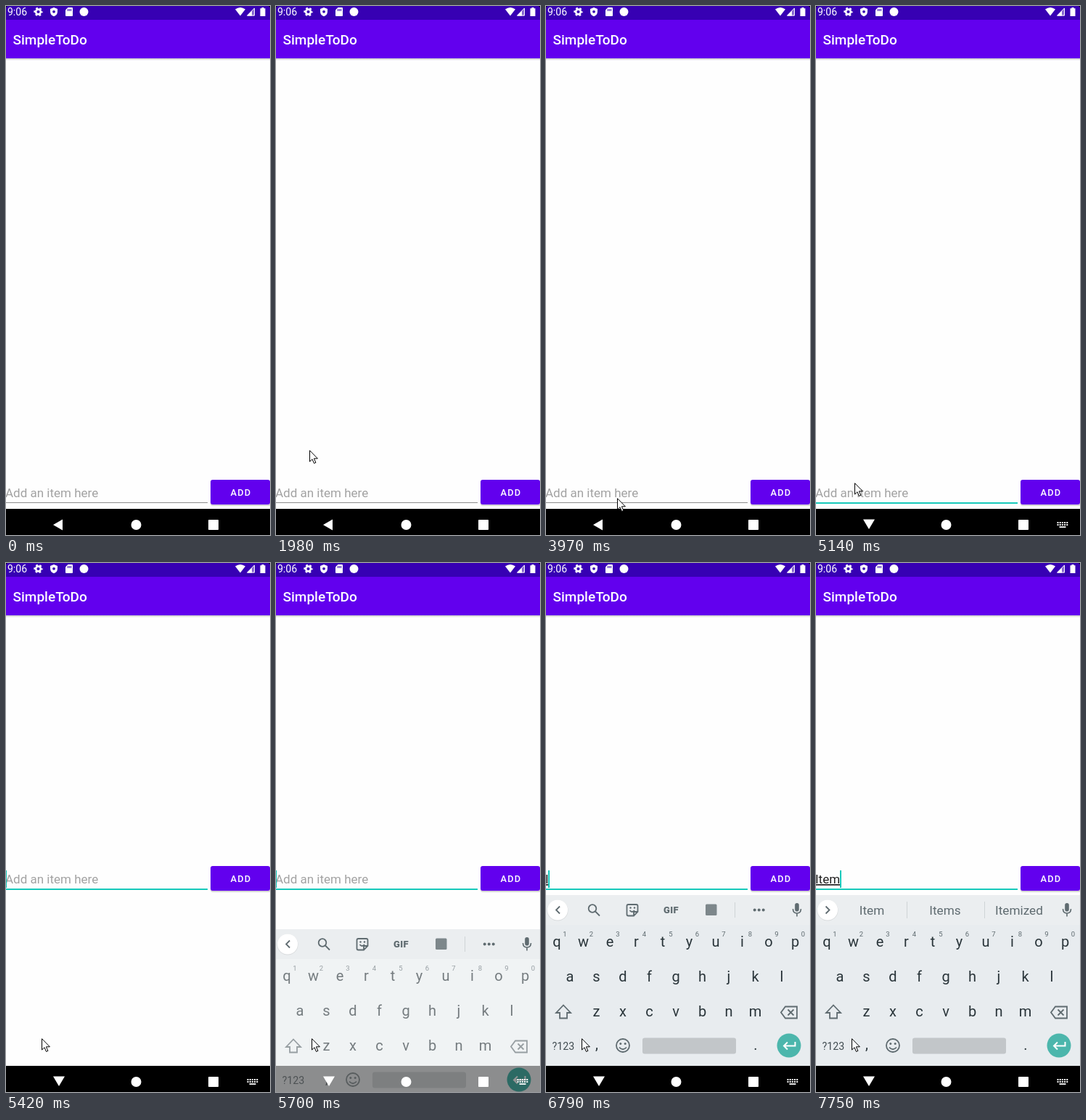
Recreate the animation shown at these times as an HTML page. Size 364 by 728 pixels, loop 8 s.

```html
<!DOCTYPE html>
<html lang="en">
<head>
<meta charset="utf-8">
<title>To-do app</title>
<style>
html, body { margin: 0; width: 100%; height: 100%; overflow: hidden; background: #fefefe; }
svg { display: block; width: 364px; height: 728px; }
text { font-family: Roboto, "Noto Sans", sans-serif; }
.mid { text-anchor: middle; }
.line { fill: none; stroke: #5f6b70; stroke-width: 1.8; }
.grey { fill: #5f6b70; }
.word { font-size: 17px; fill: #202020; text-decoration: underline; text-decoration-thickness: 1px; }
.suggest text { font-size: 17.2px; fill: #5f6b70; text-anchor: middle; }
.key { font-size: 20px; fill: #2a353a; text-anchor: middle; }
.digit { font-size: 9.5px; fill: #5f6b70; text-anchor: middle; }

.anim { animation: 8s step-end infinite; }
#cursor { animation-name: cursor; }
#row { animation-name: row; }
#caret { animation-name: caret; }
#focus { animation-name: focus; }
#hint { animation-name: hint; }
#back { animation-name: back; }
#down { animation-name: down; }
#navbg { animation-name: navbg; }
#board { animation-name: board; }
#keys { animation-name: keys; }
#tools { animation-name: tools; }
#suggest { animation-name: suggest; }
.s1 { animation-name: s1; }
.s2 { animation-name: s2; }
.s3 { animation-name: s3; }
.s4 { animation-name: s4; }
#w1 { animation-name: w1; }

@keyframes cursor {
  0% { opacity: 0; transform: translate(35px, 636px); }
  14.375% { opacity: 1; transform: translate(35px, 636px); }
  16.25% { opacity: 1; transform: translate(41px, 628px); }
  17.75% { opacity: 1; transform: translate(46px, 620px); }
  24.75% { opacity: 1; transform: translate(46px, 611px); }
  26.25% { opacity: 1; transform: translate(44px, 548px); }
  28.125% { opacity: 1; transform: translate(46px, 547px); }
  30% { opacity: 1; transform: translate(21px, 540px); }
  31.625% { opacity: 1; transform: translate(317px, 510px); }
  33.5% { opacity: 1; transform: translate(352px, 494px); }
  35.125% { opacity: 0; transform: translate(352px, 494px); }
  44.375% { opacity: 1; transform: translate(271px, 378px); }
  46.25% { opacity: 1; transform: translate(214px, 500px); }
  47.75% { opacity: 1; transform: translate(145px, 617px); }
  49.625% { opacity: 1; transform: translate(98px, 677px); }
  51.125% { opacity: 1; transform: translate(84px, 673px); }
  52.625% { opacity: 1; transform: translate(72px, 667px); }
  54.5% { opacity: 1; transform: translate(60px, 661px); }
  56% { opacity: 1; transform: translate(54px, 658px); }
  64.25% { opacity: 1; transform: translate(53px, 656px); }
  65.875%, 100% { opacity: 1; transform: translate(49px, 654px); }
}
@keyframes row {
  0% { transform: none; }
  65.875%, 100% { transform: translateY(-235px); }
}
@keyframes caret {
  0% { opacity: 0; transform: none; }
  57.5% { opacity: 1; transform: none; }
  62.5% { opacity: 0; transform: none; }
  67.75% { opacity: 1; transform: none; }
  73.125% { opacity: 0; transform: none; }
  80.25% { opacity: 1; transform: none; }
  84.875% { opacity: 1; transform: translateX(4px); }
  89.875% { opacity: 1; transform: translateX(10px); }
  93.375% { opacity: 1; transform: translateX(19px); }
  96.875%, 100% { opacity: 1; transform: translateX(34px); }
}
@keyframes focus { 0% { opacity: 0; } 57.5%, 100% { opacity: 1; } }
@keyframes hint { 0% { opacity: 1; } 84.875%, 100% { opacity: 0; } }
@keyframes back { 0% { opacity: 1; } 60.875% { opacity: .4; } 62.5%, 100% { opacity: 0; } }
@keyframes down { 0% { opacity: 0; } 60.875% { opacity: .6; } 62.5%, 100% { opacity: 1; } }
@keyframes navbg { 0% { opacity: 1; } 71.25% { opacity: .42; } 73.125%, 100% { opacity: 1; } }
@keyframes board {
  0% { opacity: 0; transform: translateY(47px); }
  71.25% { opacity: 1; transform: translateY(47px); }
  73.125%, 100% { opacity: 1; transform: none; }
}
@keyframes keys { 0% { opacity: .65; } 73.125%, 100% { opacity: 1; } }
@keyframes tools { 0% { opacity: 1; } 86.375%, 100% { opacity: 0; } }
@keyframes suggest { 0% { opacity: 0; } 86.375%, 100% { opacity: 1; } }
@keyframes w1 { 0% { opacity: 0; } 84.875% { opacity: 1; } 89.875%, 100% { opacity: 0; } }
@keyframes s1 { 0% { opacity: 0; } 86.375% { opacity: 1; } 89.875%, 100% { opacity: 0; } }
@keyframes s2 { 0% { opacity: 0; } 89.875% { opacity: 1; } 93.375%, 100% { opacity: 0; } }
@keyframes s3 { 0% { opacity: 0; } 93.375% { opacity: 1; } 96.875%, 100% { opacity: 0; } }
@keyframes s4 { 0% { opacity: 0; } 96.875%, 100% { opacity: 1; } }
</style>
</head>
<body>
<svg viewBox="0 0 364 728">
  <defs>
    <linearGradient id="shade" x2="0" y2="1">
      <stop stop-color="#000" stop-opacity=".22"/>
      <stop offset="1" stop-color="#000" stop-opacity="0"/>
    </linearGradient>
  </defs>
  <rect width="364" height="728" fill="#fefefe"/>

  <!-- app bar and status bar -->
  <rect y="72" width="364" height="3" fill="url(#shade)"/>
  <rect y="19" width="364" height="53" fill="#6200ee"/>
  <rect width="364" height="19" fill="#3700b3"/>
  <text x="9.5" y="53" font-size="19" font-weight="500" fill="#fff">SimpleToDo</text>
  <g fill="#fff">
    <text x="2" y="13.3" font-size="14">9:06</text>
    <g transform="translate(44.5 8)">
      <circle r="3.4" fill="none" stroke="#fff" stroke-width="2.6"/>
      <circle r="5.2" fill="none" stroke="#fff" stroke-width="2" stroke-dasharray="2.7 2.745" stroke-dashoffset="1.35"/>
    </g>
    <path d="M66 2l5 2v4c0 3-2 5.300-5 6.300c-3-1-5-3.300-5-6.300V4z"/>
    <circle cx="66" cy="7.800" r="1.900" fill="#3700b3"/>
    <path d="M85.500 2H91q1 0 1 1v10q0 1-1 1H83q-1 0-1-1V5.500z"/>
    <path d="M85.500 4v3M87.500 4v3M89.500 4v3" stroke="#3700b3"/>
    <circle cx="107.500" cy="8" r="6"/>
    <path d="M316 4.500q7-5 14 0L323 13.500z"/>
    <path d="M343 2.500v11H332z" opacity=".4"/>
    <path d="M339 6.500v7h-7z"/>
    <path d="M342.500 3v10H332.800z" fill="none" stroke="#fff"/>
    <path d="M352.500 2h3v1.200h2V14h-7V3.200h2z"/>
  </g>
  <path d="M0 0h3q-3 0-3 3zM364 0v3q0-3-3-3z" fill="#000"/>

  <!-- input row -->
  <g id="row" class="anim">
    <text id="hint" class="anim" x="-1" y="676" font-size="17" fill="#a2a2a2">Add an item here</text>
    <rect y="683" width="278" height="1" fill="#8c8c8c"/>
    <rect id="focus" class="anim" y="683" width="278" height="2" fill="#16c9bb"/>
    <text id="w1" class="word anim" x="-1" y="676">I</text>
    <text class="word anim s2" x="-1" y="676">It</text>
    <text class="word anim s3" x="-1" y="676">Ite</text>
    <text class="word anim s4" x="-1" y="676">Item</text>
    <rect id="caret" class="anim" x="-1" y="658" width="2" height="24" fill="#16c9bb"/>
    <rect x="282" y="653" width="83" height="35" rx="3.500" fill="#000" opacity=".16"/>
    <rect x="282" y="652" width="82" height="34" rx="3" fill="#6200ee"/>
    <text class="mid" x="324" y="674" font-size="12.800" font-weight="500" letter-spacing="1.200" fill="#fff">ADD</text>
  </g>

  <!-- keyboard -->
  <g id="board" class="anim">
    <g id="keys" class="anim">
      <rect y="457" width="364" height="235" fill="#e8ecef"/>
      <g id="letters"></g>
      <path class="line" d="M24 608.500L34 619h-5v7.500H19V619h-5z"/>
      <path class="line" d="M330 610.500h16v16h-16l-6-8zM333.500 614.500l8 8m0-8l-8 8"/>
      <text x="8.500" y="669.500" font-size="14.200" fill="#414c51">?123</text>
      <text class="key" x="70" y="669">,</text>
      <text class="key" x="289" y="670">.</text>
      <circle class="line" cx="106" cy="664" r="9"/>
      <path class="line" d="M101 666.500q5 5.500 10 0"/>
      <circle class="grey" cx="102.800" cy="661.500" r="1.500"/>
      <circle class="grey" cx="109.200" cy="661.500" r="1.500"/>
      <rect x="133" y="653.500" width="129" height="22" rx="3" fill="#c2c6c9"/>
    </g>
    <circle cx="335" cy="664" r="16.500" fill="#4cb6ac"/>
    <path d="M343.500 659v5.500H328m5-5l-5 5l5 5" fill="none" stroke="#fff" stroke-width="2"/>

    <rect y="457" width="364" height="41" fill="#ebeef0"/>
    <circle cx="16" cy="478" r="14.500" fill="#000" opacity=".08"/>
    <circle cx="16" cy="477.500" r="14" fill="#fff"/>
    <g class="line" transform="translate(346 477)">
      <rect class="grey" x="-2.800" y="-9" width="5.600" height="11.500" rx="2.800" stroke="none"/>
      <path d="M-5.500-1q0 6 5.500 6t5.500-6M0 5v4.500" stroke-width="1.600"/>
    </g>
    <g id="tools" class="anim">
      <path class="line" d="M19 472.500l-5 5l5 5"/>
      <circle class="line" cx="64" cy="475.500" r="5.300"/>
      <path class="line" d="M68 479.500l6 6" stroke-width="2.300"/>
      <path class="line" d="M113.500 470h11q2 0 2 2v8l-5.500 5.500h-7.500q-2 0-2-2V472q0-2 2-2zM126.500 480h-5.500v5.500M115.500 478q3 4 6.500 0"/>
      <circle class="grey" cx="116.500" cy="474.500" r="1.200"/>
      <circle class="grey" cx="122" cy="474.500" r="1.200"/>
      <text class="grey mid" x="172.500" y="482" font-size="13" font-weight="900" letter-spacing=".4">GIF</text>
      <rect x="220" y="469.500" width="15.500" height="15.500" rx="1.500" fill="#7d878b"/>
      <path d="M260.500 467v21" stroke="#cfd4d6"/>
      <g class="grey">
        <circle cx="287.700" cy="477.500" r="2"/><circle cx="293.700" cy="477.500" r="2"/><circle cx="299.700" cy="477.500" r="2"/>
      </g>
    </g>
    <g id="suggest" class="suggest anim">
      <path class="line" d="M13.500 472.500l5 5l-5 5"/>
      <path d="M125.500 466v23M232.500 466v23" stroke="#cfd4d6"/>
      <g class="anim s1"><text x="77" y="484">I</text><text x="178" y="484">I'm</text><text x="280" y="484">I'll</text></g>
      <g class="anim s2"><text x="77" y="484">It</text><text x="178" y="484">It's</text><text x="280" y="484">Its</text></g>
      <g class="anim s3"><text x="77" y="484">Ite</text><text x="178" y="484">Item</text><text x="280" y="484">It's</text></g>
      <g class="anim s4"><text x="77" y="484">Item</text><text x="178" y="484">Items</text><text x="280" y="484">Itemized</text></g>
    </g>
  </g>

  <!-- navigation bar -->
  <rect id="navbg" class="anim" y="692" width="364" height="36"/>
  <g fill="#fff">
    <path id="back" class="anim" d="M65 714l13-7.500v15z"/>
    <g id="down" class="anim">
      <path d="M65 706.500h16l-8 13.500z"/>
      <path d="M332.500 711h15M332.500 714h15" stroke="#fff" stroke-width="2" stroke-dasharray="2 1.200"/>
      <path d="M335.500 717h9" stroke="#fff" stroke-width="1.800"/>
    </g>
    <circle cx="179.500" cy="714" r="7"/>
    <rect x="279" y="707" width="14" height="14" rx=".8"/>
  </g>

  <g id="cursor" class="anim">
    <path d="M.5.700V16l3.500-3.300l2.500 5.700l2.400-1l-2.500-5.600h5z" fill="#fff" stroke="#000"/>
  </g>
</svg>
<script>
const letters = document.getElementById("letters");

function label(kind, x, y, str) {
  const el = document.createElementNS("http://www.w3.org/2000/svg", "text");
  el.setAttribute("class", kind);
  el.setAttribute("x", x);
  el.setAttribute("y", y);
  el.textContent = str;
  letters.append(el);
}

const step = 36.5;
[["qwertyuiop", 15, 528], ["asdfghjkl", 33, 576], ["zxcvbnm", 69.5, 624]].forEach(([row, x, y]) =>
  [...row].forEach((ch, i) => label("key", x + i * step, y, ch)));
[..."1234567890"].forEach((ch, i) => label("digit", 26 + i * step, 514, ch));
</script>
</body>
</html>
```
